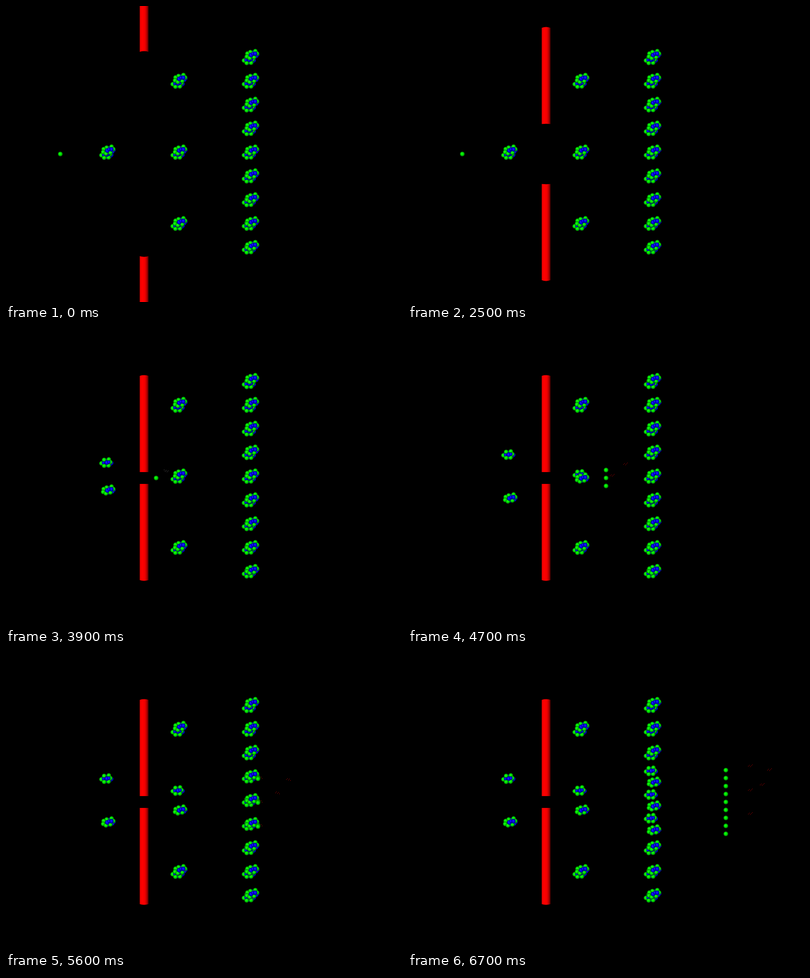
These frames come from a looping animation (800 px wide and 600 px high, 8.7 s). An HTML page with a canvas:

```html
<!DOCTYPE html>
<html lang="en">
<head>
<meta charset="utf-8">
<title>Chain reaction</title>
<style>
html, body { margin: 0; width: 100%; height: 100%; overflow: hidden; background: #000; }
canvas { display: block; width: 800px; height: 600px; }
</style>
</head>
<body>
<canvas id="stage" width="800" height="600"></canvas>
<script>
const ctx = document.getElementById('stage').getContext('2d');
const LOOP = 8700, HOLD = 2000, STEP = 100, LAST = 48;
const UNIT = 48.4, MID = 300;
const GENERATION = 12; // steps between two fissions
const RADIUS = 4.6;
const GREEN = ['#18ff18', '#00e400', '#006400'];
const BLUE = ['#2a2aff', '#0000f4', '#00006e'];

// Balls of each fragment, back to front: x, y, color
const LOWER_HALF = [
  [10, 1, BLUE], [7, 3, BLUE], [-1, -4, BLUE], [-6, -1, BLUE], [0, 5, BLUE],
  [-4.5, -5.5, GREEN], [5, -6.5, GREEN], [-10, 1.5, GREEN],
  [8, -1, GREEN], [-4.5, 6.5, GREEN], [4.5, 6, GREEN],
  [1, 0, BLUE], [-6, 0.5, BLUE, 3], [5, -1, BLUE, 3.4]
];
const UPPER_HALF = [
  [10.5, 0, BLUE], [8, 3, BLUE], [2, -4, BLUE], [-6, 1, BLUE], [0, 5, BLUE],
  [-3.5, -5, GREEN], [6.5, -7, GREEN], [-9.5, -2, GREEN], [10, -2, GREEN],
  [-10.5, 4, GREEN], [-5, 7, GREEN], [4, 5, GREEN],
  [-2, 1, BLUE], [6, -1.5, BLUE], [1, -1.5, BLUE, 3.2]
];

// Column of nuclei: x, half the number of neighbours, spacing,
// rows that split, step of fission, travel of the fragments
const COLUMNS = [
  { x: 206.5, reach: 0, gap: 0, hit: 0, at: 12, travel: 48.4 },
  { x: 351.7, reach: 1, gap: 3 * UNIT, hit: 0, at: 24, travel: 24.2 },
  { x: 496.9, reach: 4, gap: UNIT, hit: 1, at: 36, travel: 16.1 }
];
const START_X = COLUMNS[0].x - 2 * UNIT;

const clamp = (v, lo, hi) => Math.min(hi, Math.max(lo, v));
const range = reach => Array.from({ length: 2 * reach + 1 }, (_, i) => i - reach);

function ball(x, y, colors, r = RADIUS) {
  const fill = ctx.createRadialGradient(x - r * 0.2, y - r * 0.2, 0, x, y, r);
  colors.forEach((c, i) => fill.addColorStop([0, 0.55, 1][i], c));
  ctx.fillStyle = fill;
  ctx.beginPath();
  ctx.arc(x, y, r, 0, 2 * Math.PI);
  ctx.fill();
}

function half(x, y, balls) {
  for (const [dx, dy, colors, r] of balls) ball(x + dx, y + dy, colors, r);
}

function nucleus(x, y, split) {
  const parallax = 0.0085;
  half(x - 5 - (x - 351) * parallax, y + 1 - (y - MID) * parallax - split, LOWER_HALF);
  half(x + 0.3, y - 8 + split, UPPER_HALF);
}

function nuclei(k) {
  for (const c of COLUMNS) {
    const progress = clamp((k - c.at) / GENERATION, 0, 1);
    for (const row of range(c.reach)) {
      nucleus(c.x, MID + row * c.gap, Math.abs(row) <= c.hit ? c.travel * progress : 0);
    }
  }
}

function rod(top, bottom) {
  const left = 270, right = 288, mid = 279;
  const bulge = y => y + (y - MID) * 0.014;
  const fill = ctx.createLinearGradient(left, 0, right, 0);
  [[0, '#b00000'], [0.12, '#f40000'], [0.3, '#ff0000'], [0.6, '#f00000'],
   [0.82, '#b00000'], [1, '#400000']].forEach(s => fill.addColorStop(...s));
  ctx.fillStyle = fill;
  ctx.beginPath();
  ctx.moveTo(left, top);
  ctx.quadraticCurveTo(mid, bulge(top), right, top);
  ctx.lineTo(right, bottom);
  ctx.quadraticCurveTo(mid, bulge(bottom), left, bottom);
  ctx.fill();
}

function rods(k) {
  const shift = 4.03 * UNIT * clamp(k / 8, 0, 1);
  rod(shift - 102, 93 + shift);
  rod(507 - shift, 702 - shift);
}

function neutrons(k) {
  const first = COLUMNS[0];
  const x = k < first.at
    ? START_X + UNIT * clamp(k - 8, 0, 2)
    : first.x + (k - first.at) * UNIT / 4;
  const outer = UNIT * clamp((k - 24) / GENERATION, 0, 1);
  const inner = UNIT / 3 * clamp((k - 36) / GENERATION, 0, 1);
  for (const i of range(k > 24 ? 1 : 0)) {
    for (const j of range(k > 36 ? 1 : 0)) ball(x, MID + i * outer + j * inner, GREEN, 4.8);
  }
}

function ray(x, y, k) {
  ctx.fillStyle = k < 24 ? '#666' : '#c00000';
  for (let i = 0; i < 5; i++) {
    const dy = (i * 3 + k) % 5 - 2;
    ctx.fillRect(Math.round(x - 4 + 2 * i), Math.round(y + dy), 1, 1);
  }
}

function rays(k) {
  const speed = [[14.53, -1.83], [15.13, -1.5], [16.2, -2.1]];
  COLUMNS.forEach((c, i) => {
    const age = k - c.at;
    if (age <= 0) return;
    for (const row of range(c.hit)) {
      ray(c.x + speed[i][0] * age, MID + row * c.gap + speed[i][1] * age, k);
    }
  });
}

function draw(k) {
  ctx.fillStyle = '#000';
  ctx.fillRect(0, 0, 800, 600);
  rods(k);
  rays(k);
  const phase = k % GENERATION;
  const leaving = k > GENERATION && phase > 0 && phase < 6;
  if (!leaving) neutrons(k);
  nuclei(k);
  if (leaving) neutrons(k);
}

const begin = performance.now();
let shown = -1;
function tick() {
  const t = (performance.now() - begin) % LOOP;
  const k = t < HOLD ? 0 : Math.min(LAST, 1 + Math.floor((t - HOLD) / STEP));
  if (k !== shown) draw(shown = k);
  requestAnimationFrame(tick);
}
tick();
</script>
</body>
</html>
```
